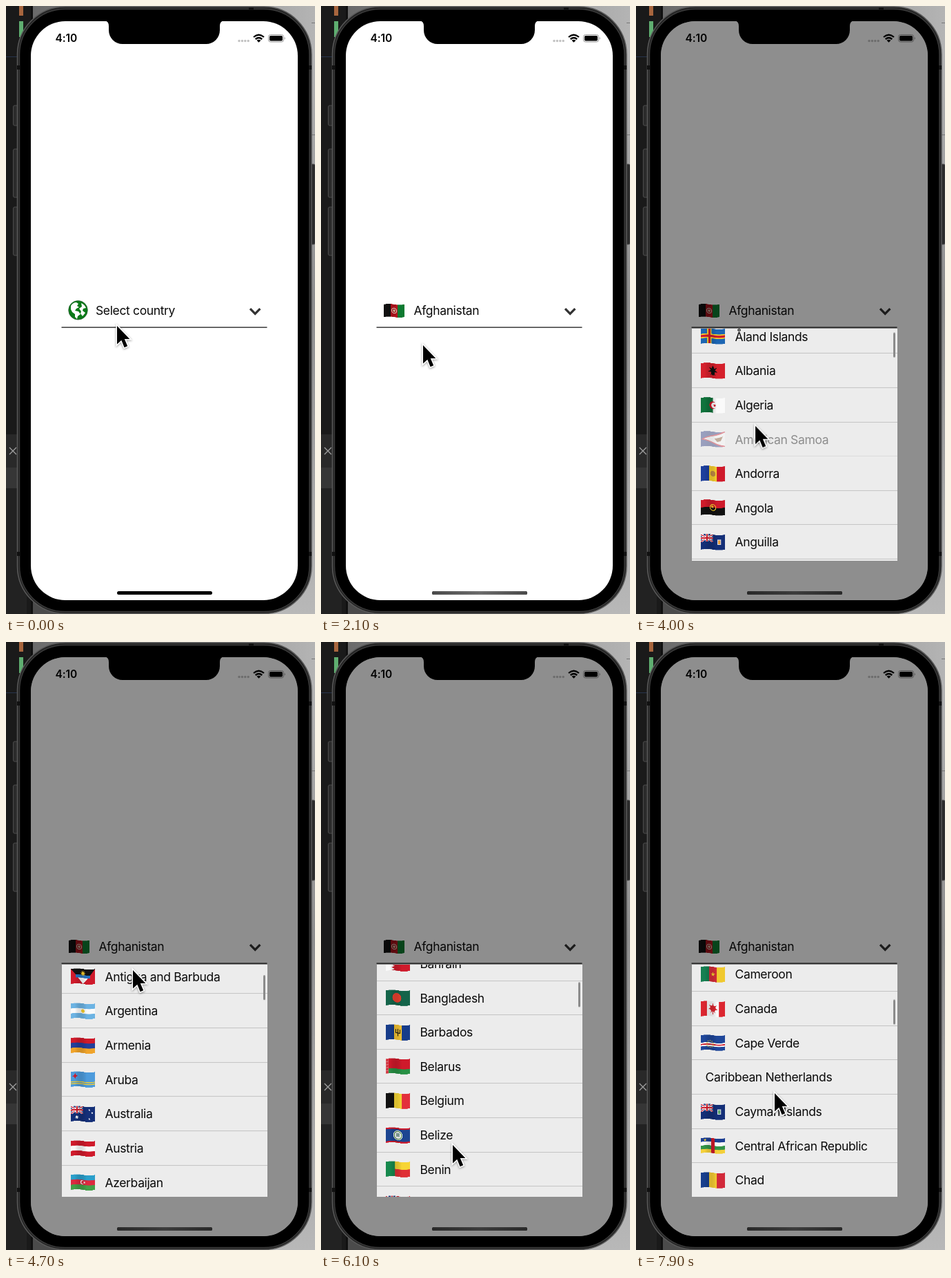
Recreate the animation shown at these times as an HTML page with a canvas. Size 448 by 880 pixels, loop 8 s.

```html
<!DOCTYPE html>
<html lang="en">
<head>
<meta charset="utf-8">
<title>Country picker</title>
<style>
@property --scroll { syntax: "<number>"; inherits: true; initial-value: 0; }

html, body { margin: 0; width: 100%; height: 100%; overflow: hidden; }
body { background: #171717; }
#stage { position: relative; width: 448px; height: 880px; overflow: hidden;
  font: 17.5px/1 Inter, "Noto Sans", sans-serif; letter-spacing: -.36px; color: #0a0a0a; }
#stage * { box-sizing: border-box; }
svg, .dim, .panel, .thumb, .field, .home, .cursor { position: absolute; }
svg { left: 0; top: 0; }

.screen { position: absolute; left: 36px; top: 22px; width: 387px; height: 838px;
  border-radius: 50px; background: #fff; overflow: hidden; }
.dim { inset: 0; background: #000; opacity: 0; animation: dim 8s linear infinite; }
.home { left: 125px; top: 825px; width: 138px; height: 5px; border-radius: 3px;
  background: #000; overflow: hidden; }
.home::after { content: ""; position: absolute; inset: 0;
  background: linear-gradient(90deg, #4a4a4a, #6c6c6c 50%, #4a4a4a); animation: after 8s step-end infinite; }

.field { left: 130px; top: 431px; line-height: 20px; white-space: nowrap; }
.before { animation: before 8s step-end infinite; }
.after { left: 134.5px; animation: after 8s step-end infinite; }
.after canvas { position: absolute; left: -43.5px; top: -1.5px; width: 30px; height: 22.6px; }

.panel { left: 80.5px; top: 467px; width: 298px; height: 336px; background: #ececec;
  overflow: hidden; opacity: 0;
  animation: open 8s linear infinite, scroll 8s linear infinite; }
.list { transform: translateY(calc(.8px - var(--scroll) * 1px)); }
.row { position: relative; height: 49.65px; line-height: 49.65px; padding-left: 63px;
  border-bottom: 1px solid #c3c3c3; white-space: nowrap; }
.row.bare { padding-left: 20px; }
.row canvas { position: absolute; left: 13.5px; top: 11.6px; width: 34.5px; height: 26px; }
.row:nth-child(1) { animation: tap 8s linear infinite; }
.row:nth-child(5) { animation: touch 8s linear infinite; }
.thumb { right: 2.5px; top: 4.4px; width: 3px; height: 36px; border-radius: 2px; background: #8b8b8b;
  transform: translateY(calc(var(--scroll) * .0245px)); animation: thumb 8s linear infinite; }
.cursor { left: 1px; top: 2px; overflow: visible; filter: drop-shadow(0 1.5px 1.5px #0006);
  animation: cursor 8s cubic-bezier(.45, 0, .55, 1) infinite; }

@keyframes before { 0% { opacity: 1; } 22.5%, 100% { opacity: 0; } }
@keyframes after { 0% { opacity: 0; } 22.5%, 100% { opacity: 1; } }
@keyframes dim {
  0%, 13% { opacity: 0; } 16.25%, 22.5% { opacity: .443; }
  25.5%, 33.5% { opacity: 0; } 37%, 100% { opacity: .443; }
}
@keyframes open {
  0%, 13% { opacity: 0; } 16.25%, 22.5% { opacity: 1; }
  25.5%, 33.5% { opacity: 0; } 37%, 100% { opacity: 1; }
}
@keyframes tap { 0%, 20% { opacity: 1; } 21.3%, 22.5% { opacity: .4; } 25.5%, 100% { opacity: 1; } }
@keyframes touch { 0%, 47.8% { opacity: 1; } 49.5%, 50.2% { opacity: .42; } 53%, 100% { opacity: 1; } }
@keyframes thumb { 0%, 47.5% { opacity: 0; } 49%, 100% { opacity: 1; } }

/* drags run with the pointer, then the list coasts to a stop */
@keyframes scroll {
  0%, 47.5% { --scroll: 0; }
  50% { --scroll: 63.6; }
  56% { --scroll: 200; animation-timing-function: cubic-bezier(.33, .68, .67, .87); }
  66.25% { --scroll: 762.7; animation-timing-function: cubic-bezier(.33, .67, .67, .865); }
  76.25% { --scroll: 870.7; }
  76.9% { --scroll: 872; animation-timing-function: ease-in; }
  80.6% { --scroll: 1086; animation-timing-function: cubic-bezier(.33, .64, .67, .86); }
  90% { --scroll: 1750.7; animation-timing-function: cubic-bezier(.33, .62, .67, .85); }
  98.75% { --scroll: 1897.7; }
  100% { --scroll: 1906; }
}
@keyframes cursor {
  0% { transform: translate(160px, 461px); }
  5% { transform: translate(152px, 474px); }
  10.6%, 13% { transform: translate(149px, 447px); }
  18.75% { transform: translate(146px, 488px); }
  26.25% { transform: translate(147px, 489px); }
  31%, 33.5% { transform: translate(150px, 445px); }
  42% { transform: translate(170px, 660px); }
  47.5% { transform: translate(172px, 669.6px); animation-timing-function: linear; }
  50% { transform: translate(172px, 606px); animation-timing-function: linear; }
  56% { transform: translate(182px, 470px); }
  66.25% { transform: translate(189px, 491px); }
  68% { transform: translate(189px, 493px); }
  75% { transform: translate(190px, 724px); }
  76.25%, 76.9% { transform: translate(190px, 726px); animation-timing-function: ease-in; }
  80.6% { transform: translate(200px, 512px); animation-timing-function: ease-out; }
  82.5% { transform: translate(204px, 503px); }
  90% { transform: translate(208px, 612px); }
  98.75%, 100% { transform: translate(200px, 651px); }
}
</style>
</head>
<body>
<div id="stage">
  <svg width="448" height="880">
    <defs>
      <linearGradient id="top"><stop stop-color="#6a6a6a"/><stop offset="1" stop-color="#b4b4b4"/></linearGradient>
      <linearGradient id="side" x2="0" y2="1"><stop stop-color="#b4b4b4"/><stop offset=".45" stop-color="#8e8e8e"/><stop offset="1" stop-color="#b8b8b8"/></linearGradient>
    </defs>
    <path fill="#1a1a1a" d="M0 0H39V880H0z"/>
    <path fill="url(#top)" d="M39 0H448V90H39z"/>
    <path fill="url(#side)" d="M380 60H448V880H380z"/>
    <path fill="#4b4b4b" d="M39 800H380V880H39z"/>
    <path fill="#101010" d="M36 0h3v880h-3z"/>
    <path fill="#a8663e" d="M19 0h6v14h-6z"/>
    <path fill="#5fae70" d="M19 22h6v23h-6z"/>
    <path fill="#27344d" d="M0 73h18v1H0z"/>
    <path fill="#292929" d="M0 620h20v48H0z"/>
    <path fill="#363636" d="M0 668h20v30H0z"/>
    <path fill="#222" d="M0 698h30v182H0z"/>
    <path stroke="#a0a0a0" stroke-width="1.3" d="M5 639l10 10M15 639l-10 10"/>
    <g fill="#2b2b2b" stroke="#4c4c4c">
      <rect x="10.500" y="144" width="9" height="29" rx="2"/>
      <rect x="10.500" y="207" width="9" height="70" rx="2"/>
      <rect x="10.500" y="291" width="9" height="70" rx="2"/>
      <rect x="440" y="229" width="8" height="116" rx="2"/>
    </g>
    <path stroke="#777" d="M443 24.500h5M443 186.500h5"/>
    <rect x="16.500" y="1" width="426.500" height="878.500" rx="69" fill="#232323" stroke="#5a5a5a" stroke-width="1.500"/>
    <rect x="19.500" y="4.500" width="420.500" height="872" rx="66" fill="#000" stroke="#3a3a3a" stroke-width="1.500"/>
    <path fill="#111" d="M16 86h4v6h-4zM16 790h4v6h-4zM439 86h4v6h-4zM439 790h4v6h-4zM352 2h7v4h-7z"/>
  </svg>

  <div class="screen">
    <svg width="387" height="838" viewBox="36 22 387 838">
      <text x="71.500" y="52" font-size="15.500" font-weight="600" letter-spacing="-.1">4:10</text>
      <g fill="#c2c2c2"><circle cx="338" cy="50.500" r="1.700"/><circle cx="342.400" cy="50.500" r="1.700"/><circle cx="346.800" cy="50.500" r="1.700"/><circle cx="351.200" cy="50.500" r="1.700"/></g>
      <g fill="none" stroke="#000" stroke-width="2.300"><path d="M359 45Q366.500 38.500 374 45M361.700 48Q366.500 44 371.300 48"/></g>
      <path d="M363.500 49.800Q366.500 47.600 369.500 49.800L366.500 52.800z"/>
      <rect x="380.500" y="41.500" width="22" height="10.500" rx="3" fill="none" stroke="#999"/>
      <rect x="382" y="43" width="19" height="7.500" rx="1.700"/>
      <path fill="#999" d="M403.800 45q2 1.700 0 3.600z"/>
      <path fill="none" stroke="#333" stroke-width="3.300" d="M354 438.200l7.200 7.200 7.200-7.200"/>
      <path stroke="#111" stroke-width="1.300" d="M80.500 465.200H378.500"/>
      <g class="before">
        <circle cx="104.500" cy="440.300" r="13.800" fill="#0a7a18" stroke="#2f5c38" stroke-width=".7"/>
        <path fill="#fff" d="M94 434q3-5 8-5l3 2-2 3 3 2-4 2-2 3 5 1 3 4-4 3-1 4-3-3v-4l-4-3-2-4zM109 430q5 2 7 7l-4 1-1 3 4 3-4 5-3-4 1-3-3-4 4-3z"/>
      </g>
    </svg>
    <div class="home"></div>
  </div>
  <div class="field before">Select country</div>
  <div class="field after">Afghanistan</div>
  <div class="screen" style="background:none"><div class="dim"></div></div>
  <svg width="448" height="80"><path d="M143 21Q149 22 149 29V35A20 20 0 0 0 169 55H290A20 20 0 0 0 310 35V29Q310 22 316 21z"/></svg>
  <div class="panel"><div class="list"></div><div class="thumb"></div></div>
  <svg class="cursor" width="22" height="36">
    <path d="M0 0V26.500L6.300 20.700 10.600 31.200 15.200 29.200 10.800 19H18.300z" stroke="#fff" stroke-width="3.200" paint-order="stroke"/>
  </svg>
</div>

<script>
const W = 34, H = 20, SCALE = 3;
const RED = '#cf1a2b', GREEN = '#0b8042', BLUE = '#142f78', GOLD = '#f7cf2d', SKY = '#6cb3e3', WHITE = '#fafafa', BLACK = '#111';
const flat = Object.assign(document.createElement('canvas'), { width: W * SCALE, height: H * SCALE });
const g = flat.getContext('2d');
g.scale(SCALE, SCALE);

const rect = (c, x = 0, y = 0, w = W, h = H) => { g.fillStyle = c; g.fillRect(x, y, w, h); };
const rows = (...cs) => cs.forEach((c, i) => rect(c, 0, i * H / cs.length, W, H));
const cols = (...cs) => cs.forEach((c, i) => rect(c, i * W / cs.length, 0, W, H));
const disc = (c, x, y, r) => { g.fillStyle = c; g.beginPath(); g.arc(x, y, r, 0, 7); g.fill(); };
const ring = (c, x, y, r) => { g.strokeStyle = c; g.lineWidth = 1; g.beginPath(); g.arc(x, y, r, 0, 7); g.stroke(); };
const poly = (c, ...p) => {
  g.fillStyle = c;
  g.beginPath();
  for (let i = 0; i < p.length; i += 2) g.lineTo(p[i], p[i + 1]);
  g.fill();
};
const star = (c, x, y, r, n = 5) => {
  const p = [];
  for (let i = 0; i < 2 * n; i++) {
    const a = Math.PI * i / n, k = i % 2 ? r * .42 : r;
    p.push(x + k * Math.sin(a), y - k * Math.cos(a));
  }
  poly(c, ...p);
};
const cross = (c, x, y, w) => { rect(c, x - w / 2, 0, w, H); rect(c, 0, y - w / 2, W, w); };
const moon = (c, back, x, y, r) => { disc(c, x, y, r); disc(back, x + r * .35, y, r * .8); };
const saltire = (c, w, h, width) => {
  g.strokeStyle = c;
  g.lineWidth = width;
  g.beginPath();
  g.moveTo(0, 0); g.lineTo(w, h); g.moveTo(w, 0); g.lineTo(0, h);
  g.stroke();
};
const ensign = (field, badge) => {
  rect(field);
  g.save();
  g.beginPath(); g.rect(0, 0, 17, 10); g.clip();
  rect(BLUE);
  saltire(WHITE, 17, 10, 2.6); saltire(RED, 17, 10, 1);
  cross(WHITE, 8.5, 5, 3.6); cross(RED, 8.5, 5, 2);
  g.restore();
  if (badge) { rect('#d9dce6', 23, 6, 5.5, 7); rect(badge, 24, 7, 3.5, 5); }
};
const triangle = (c, w) => poly(c, 0, 0, w, H / 2, 0, H);

const flags = {
  'Afghanistan': () => { cols(BLACK, '#b9151f', '#0d7a31'); ring('#ecd9c8', 17, 10, 4); disc('#ddb9a0', 17, 10, 2); },
  'Åland Islands': () => { rect('#1d66b3'); cross(GOLD, 12, 10, 6); cross(RED, 12, 10, 3); },
  'Albania': () => { rect('#d5202c'); star(BLACK, 17, 10, 7, 7); rect(BLACK, 15.5, 5, 3, 11); },
  'Algeria': () => { cols('#10733c', WHITE); moon(RED, WHITE, 17, 10, 5); star(RED, 19.5, 10, 2.4); },
  'American Samoa': () => { rect('#27367f'); poly(RED, W, -1, 0, 10, W, 21); poly(WHITE, W, 1, 4, 10, W, 19); poly('#8a562f', 19, 9, 31, 6, 28, 12, 23, 13); },
  'Andorra': () => { cols('#1d3f9c', GOLD, RED); disc('#c08a45', 17, 10, 3.7); },
  'Angola': () => { rows(RED, BLACK); ring(GOLD, 17, 10, 4); star(GOLD, 16, 9, 2.5); },
  'Anguilla': () => ensign(BLUE, '#e79a3a'),
  'Antarctica': () => { rect('#4b88c9'); disc(WHITE, 18, 10, 5.5); disc(WHITE, 13, 8, 2.5); },
  'Antigua and Barbuda': () => { rect(RED); poly(BLACK, 0, 0, W, 0, 17, H); rect('#2673c0', 7, 8, 20, 4); poly(WHITE, 10, 12, 24, 12, 17, H); star(GOLD, 17, 6, 4, 9); },
  'Argentina': () => { rows(SKY, WHITE, SKY); disc(GOLD, 17, 10, 2.4); },
  'Armenia': () => rows(RED, '#223f9b', '#f0a42a'),
  'Aruba': () => { rect('#4d9bdc'); rect(GOLD, 0, 13, W, 1.2); rect(GOLD, 0, 15.5, W, 1.2); star(RED, 6, 6, 4, 4); },
  'Australia': () => { ensign(BLUE); star(WHITE, 8.5, 15, 3, 7); star(WHITE, 26, 4, 1.6); star(WHITE, 26, 16, 1.6); star(WHITE, 30, 8, 1.6); },
  'Austria': () => rows(RED, WHITE, RED),
  'Azerbaijan': () => { rows('#2a9fcb', '#dc2a40', '#43a048'); moon(WHITE, '#dc2a40', 16, 10, 2.7); star(WHITE, 19, 10, 1.7, 8); },
  'Bahamas': () => { rows('#1e95ae', '#f6d64a', '#1e95ae'); triangle(BLACK, 16); },
  'Bahrain': () => { rect(RED); rect(WHITE, 0, 0, 8, H); for (let y = 0; y < H; y += 4) poly(WHITE, 8, y, 12.5, y + 2, 8, y + 4); },
  'Bangladesh': () => { rect('#14644a'); disc('#e8412f', 15.5, 10, 6.3); },
  'Barbados': () => { cols('#173c8a', '#f5c433', '#173c8a'); rect(BLACK, 16.4, 5, 1.2, 10); rect(BLACK, 13.5, 6, 1, 5); rect(BLACK, 19.5, 6, 1, 5); rect(BLACK, 13.5, 10.3, 7, 1); },
  'Belarus': () => { rows(RED, RED, '#289145'); rect('#d9656c', 0, 0, 4, H); for (let y = 2; y < H; y += 4) star(RED, 2, y, 2, 4); },
  'Belgium': () => cols(BLACK, '#f8d837', '#e3303b'),
  'Belize': () => { rect('#1c4591'); rect(RED, 0, 0, W, 2); rect(RED, 0, 18, W, 2); disc(WHITE, 17, 10, 6.5); ring('#4c8a45', 17, 10, 5.2); rect('#88a5a0', 14.5, 7, 5, 5); },
  'Benin': () => { rows('#f7d535', '#df2f35'); rect('#17894e', 0, 0, 13, H); },
  'Bermuda': () => ensign(RED, GREEN),
  'Bhutan': () => { rect('#ee6b2b'); poly(GOLD, 0, 0, W, 0, 0, H); star(WHITE, 17, 10, 5, 6); },
  'Bolivia': () => { rows(RED, GOLD, GREEN); disc('#a07c3c', 17, 10, 2.5); },
  'Bosnia and Herzegovina': () => { rect(BLUE); poly(GOLD, 10, 0, 28, 0, 28, H); for (let i = 0; i < 5; i++) star(WHITE, 8 + i * 4, 2 + i * 4, 1.5); },
  'Botswana': () => { rect(SKY); rect(WHITE, 0, 7, W, 6); rect(BLACK, 0, 8, W, 4); },
  'Bouvet Island': () => { rect(RED); cross(WHITE, 12, 10, 5); cross(BLUE, 12, 10, 2.5); },
  'Brazil': () => { rect('#169047'); poly(GOLD, 3, 10, 17, 2, 31, 10, 17, 18); disc(BLUE, 17, 10, 4.5); },
  'British Indian Ocean Territory': () => { for (let y = 0; y < H; y += 4) { rect(WHITE, 0, y, W, 2); rect('#254d9e', 0, y + 2, W, 2); } rect(BLUE, 0, 0, 17, 10); cross(RED, 8.5, 5, 1); },
  'British Virgin Islands': () => ensign(BLUE, GREEN),
  'Brunei': () => { rect('#f5d73a'); poly(WHITE, 0, 1, W, 12, W, 17, 0, 6); poly(BLACK, 0, 5, W, 15, W, 19, 0, 9); disc(RED, 17, 10, 4); },
  'Bulgaria': () => rows(WHITE, '#12916a', RED),
  'Burkina Faso': () => { rows('#dc2436', '#1a9349'); star(GOLD, 17, 10, 4); },
  'Burundi': () => { rect(RED); triangle('#229447', 17); poly('#229447', W, 0, 17, 10, W, H); saltire(WHITE, W, H, 3.6); disc(WHITE, 17, 10, 5); star(RED, 17, 7.5, 1.6, 6); star(RED, 14.8, 11.5, 1.6, 6); star(RED, 19.2, 11.5, 1.6, 6); },
  'Cambodia': () => { rect('#203a91'); rect('#d9283a', 0, 5, W, 10); rect('#f0d5d5', 11.5, 11, 11, 2); poly('#f0d5d5', 12, 11, 14, 8, 15, 10, 17, 6, 19, 10, 20, 8, 22, 11); },
  'Cameroon': () => { cols('#168052', '#d42d39', '#f0c92f'); star(GOLD, 17, 10, 3.2); },
  'Canada': () => { rect('#dc2630'); rect(WHITE, 8.5, 0, 17, H); star('#dc2630', 17, 9.3, 7, 7); disc('#dc2630', 17, 9.5, 4); rect('#dc2630', 16.5, 12, 1, 5.5); },
  'Cape Verde': () => { rect('#1f479a'); rect(WHITE, 0, 10, W, 5); rect(RED, 0, 11.7, W, 1.6); for (let i = 0; i < 10; i++) star(GOLD, 13 + 4.5 * Math.sin(i * .628), 12 - 4.5 * Math.cos(i * .628), 1.1); },
  'Caribbean Netherlands': null,
  'Cayman Islands': () => ensign(BLUE, '#57a367'),
  'Central African Republic': () => { rows('#1d3f92', WHITE, '#339448', '#f4d03a'); rect(RED, 14.5, 0, 5, H); star(GOLD, 6, 3, 2.2); },
  'Chad': () => cols('#183f8d', '#f6cd34', '#d2293a'),
  'Chile': () => { rows(WHITE, RED); rect('#1f4aa0', 0, 0, 11, 10); star(WHITE, 5.5, 5, 3); }
};

// paints the flat cloth, then copies it column by column along a wave
function flag(draw) {
  rect(WHITE);
  draw();
  const cloth = Object.assign(document.createElement('canvas'), { width: W * SCALE, height: 24 * SCALE });
  const c = cloth.getContext('2d');
  for (let x = 0; x < cloth.width; x++) {
    const a = x / cloth.width * 2 * Math.PI, y = (2 - .8 * Math.sin(a)) * SCALE;
    c.drawImage(flat, x, 0, 1, flat.height, x, y, 1, flat.height);
    c.fillStyle = `rgba(0,0,0,${Math.max(0, -.12 * Math.cos(a + .6))})`;
    c.fillRect(x, y, 1, flat.height);
  }
  return cloth;
}

const list = document.querySelector('.list');
for (const [name, draw] of Object.entries(flags)) {
  const row = document.createElement('div');
  row.className = draw ? 'row' : 'row bare';
  if (draw) row.append(flag(draw));
  row.append(name);
  list.append(row);
}
document.querySelector('.field.after').append(flag(flags.Afghanistan));
</script>
</body>
</html>
```
